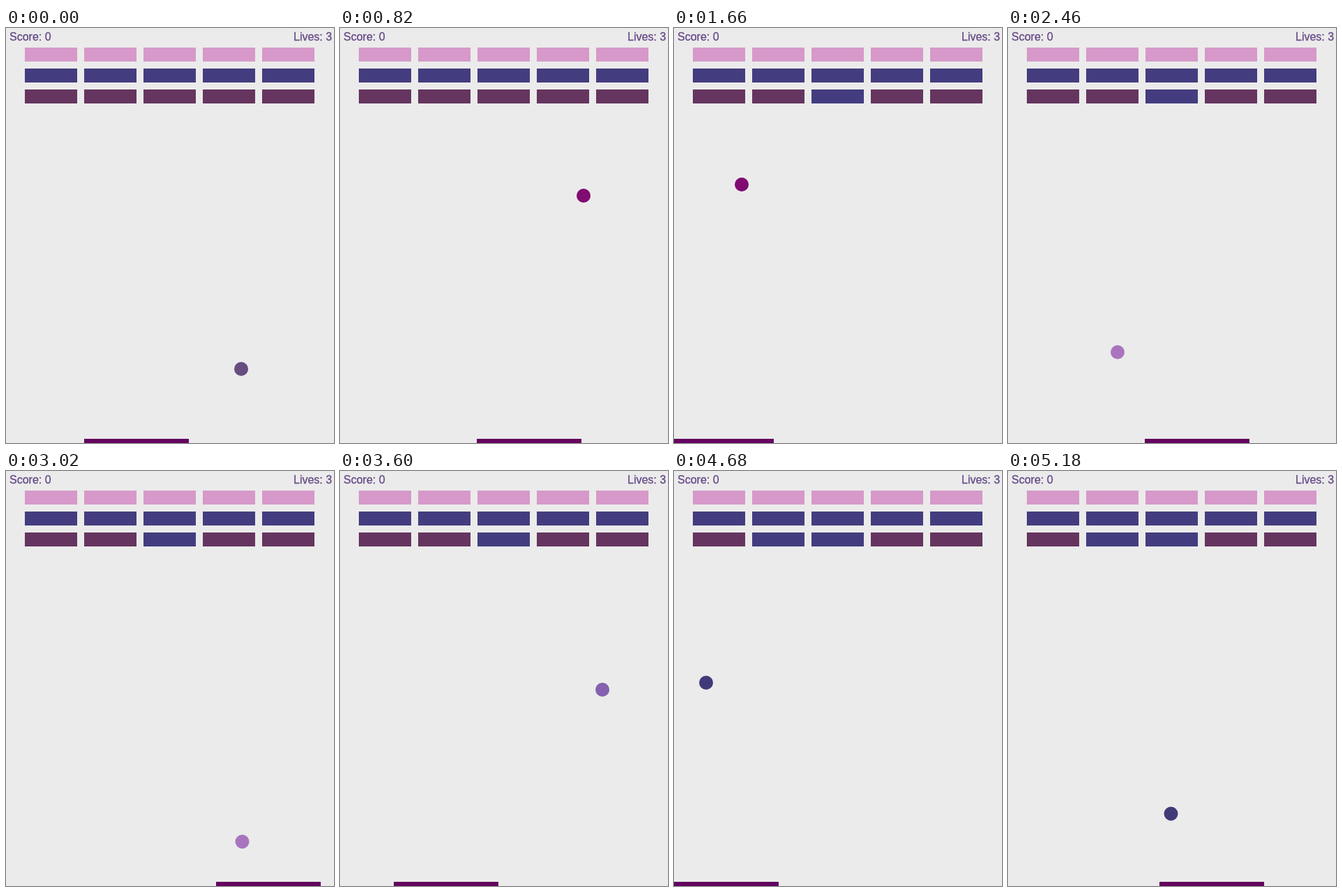
Recreate the animation shown at these times as an HTML page. Size 470x594 px, loop 5200 ms.

```html
<!DOCTYPE html>
<html lang="en">
<head>
<meta charset="utf-8">
<title>Brick breaker</title>
<style>
  html, body { margin: 0; width: 100%; height: 100%; overflow: hidden; background: #ebebeb; }
  svg { display: block; width: 470px; height: 594px; }
  text {
    font: 16px Arial, "Liberation Sans", sans-serif;
    fill: #644886; stroke: #644886; stroke-width: 0.3px;
  }
</style>
</head>
<body>
<!-- 480 x 600 playfield, cropped a little on every side -->
<svg viewBox="3 2 470 594">
  <g id="bricks"></g>
  <circle id="ball" r="10"/>
  <rect id="paddle" y="590" width="150" height="10" fill="#640460"/>
  <text x="8" y="20">Score: 0</text>
  <text x="415" y="20">Lives: 3</text>
</svg>
<script>
const FRAME = 20, FRAMES = 260, STEPS = 779;
const W = 480, H = 600, R = 10, PADDLE_STEP = 7;
const ROW_COLORS = ['#d699c9', '#433d80', '#65355f'];
const BALL_COLORS = ['#674c80', '#800b71', '#a974be', '#8460ae', '#403a78'];

// Key presses: [frame, paddle stop to head for]
const KEYS = [[1, 13], [16, 45], [32, 28], [43, 12], [57, -1], [98, 16], [112, 28],
  [138, 43], [166, 11], [203, 15], [220, 0], [234, 15], [248, 31]];

const $ = id => document.getElementById(id);

function setAttrs(el, attrs) {
  for (const [name, value] of Object.entries(attrs)) el.setAttribute(name, value);
}

const stepAt = frame => Math.ceil(frame * STEPS / (FRAMES - 1));

const bricks = [];
for (let row = 0; row < 3; row++) {
  for (let col = 0; col < 5; col++) {
    const x = 30 + col * 85, y = 30 + row * 30;
    const el = document.createElementNS('http://www.w3.org/2000/svg', 'rect');
    setAttrs(el, { x, y, width: 75, height: 20 });
    $('bricks').append(el);
    bricks.push({ x, y, row, el, hitStep: Infinity });
  }
}

// Play the whole round once and keep the state after each step
function simulate() {
  let x = 340, y = 490, dx = 2, dy = -2, bounces = 0;
  let stop = 16, goal = stop, key = 0;
  const states = [];
  for (let n = 0; n <= STEPS; n++) {
    states.push({ x, y, color: BALL_COLORS[bounces], paddle: 3 + stop * PADDLE_STEP });

    if (key < KEYS.length && n >= stepAt(KEYS[key][0])) goal = KEYS[key++][1];
    stop += Math.sign(goal - stop);

    for (const b of bricks) {
      if (b.hitStep === Infinity && x > b.x && x < b.x + 75 && y > b.y && y < b.y + 20) {
        b.hitStep = n;
        dy = -dy;
      }
    }
    if (x + dx > W - R || x + dx < R) {
      dx = -dx;
      bounces++;
    }
    // The paddle sends the ball back a little faster
    if (y + dy > H - R) {
      dy = -2.5;
      dx = 2.5 * Math.sign(dx);
    }
    x += dx;
    y += dy;
  }
  return states;
}

const states = simulate();

function draw(now) {
  const step = stepAt(Math.floor(now / FRAME) % FRAMES);
  const { x, y, color, paddle } = states[step];
  setAttrs($('ball'), { cx: x, cy: y, fill: color });
  setAttrs($('paddle'), { x: paddle });
  // A hit brick drops to the colour of the row above
  for (const b of bricks) {
    setAttrs(b.el, { fill: ROW_COLORS[step >= b.hitStep ? b.row - 1 : b.row] });
  }
}

const start = performance.now();
function tick() {
  draw(performance.now() - start);
  requestAnimationFrame(tick);
}
tick();
</script>
</body>
</html>
```
